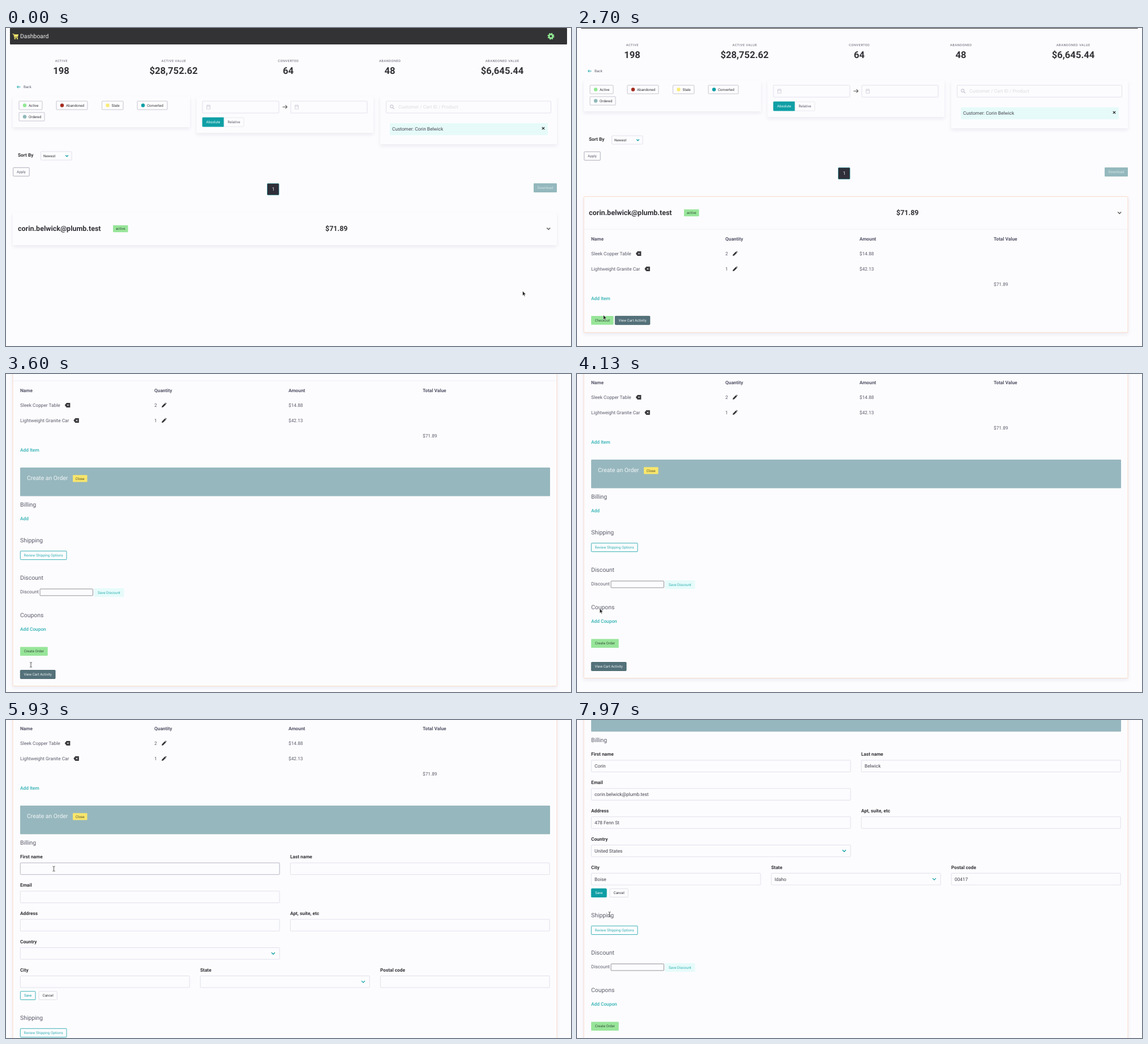
These frames come from a looping animation (998 by 561 pixels, 8000 ms). An HTML page:

```html
<!DOCTYPE html>
<html lang="en">
<head>
<meta charset="utf-8">
<title>Cart dashboard</title>
<style>
  html, body { margin: 0; width: 100%; height: 100%; overflow: hidden; background: #fcfcfe; }
  svg { display: block; width: 998px; height: 561px; font-family: Roboto, sans-serif; text-rendering: geometricPrecision; }
  text { white-space: pre; }
  .card { filter: drop-shadow(0 3px 3px rgba(20, 20, 70, .07)); }
</style>
</head>
<body>
<svg id="stage" viewBox="0 0 998 561"></svg>
<script>
const LOOP = 8000;
const SMALL = 6.3, BODY = 8.3, HEADING = 10.4;
const PAPER = '#fcfcfe', INK = '#5c5c6c', DARK = '#333338', TEAL = '#0f9fa5', LINK = '#2fb0b3',
      GREEN = '#98e59a', SLATE = '#54717a', MIST = '#97b7be', LINE = '#dadae8';
const customer = { first: 'Corin', last: 'Belwick', email: 'corin.belwick@plumb.test', street: '478 Fenn St', postal: '00417' };

// y is the vertical middle of the capitals
const text = (x, y, label, size = BODY, fill = INK, extra = '') =>
  `<text x="${x}" y="${y + size * .355}" font-size="${size}" fill="${fill}" ${extra}>${label}</text>`;
const centered = (x, y, label, size, fill, extra = '') => text(x, y, label, size, fill, `text-anchor="middle" ${extra}`);
const bold = (x, y, label, size = BODY, fill = DARK) => text(x, y, label, size, fill, 'font-weight="700"');
const link = (x, y, label, extra = '') => text(x, y, label, BODY, LINK, `font-weight="500" ${extra}`);
const box = (x, y, w, h, fill = 'none', stroke = 'none', extra = '') =>
  `<rect x="${x}" y="${y}" width="${w}" height="${h}" rx="1" fill="${fill}" stroke="${stroke}" stroke-width=".8" ${extra}/>`;
const button = (x, y, w, h, label, fill = 'none', stroke = 'none', ink = INK) =>
  box(x, y, w, h, fill, stroke) + centered(x + w / 2, y + h / 2, label, SMALL, ink);
const lines = (d, stroke = INK, width = 1) => `<path d="${d}" fill="none" stroke="${stroke}" stroke-width="${width}"/>`;
const chevron = (x, y, stroke = TEAL, size = 3) =>
  lines(`M${x - size} ${y - size / 2}l${size} ${size}l${size} ${-size}`, stroke, 1.3);
const group = (id, ...parts) => `<g id="${id}">${parts.join('')}</g>`;

const stat = (x, label, value) =>
  centered(x + .3, 58, label, 5.7, INK, 'letter-spacing=".52"') +
  centered(x, 75, value, 16.6, DARK, 'font-weight="700"');

const filter = (x, y, w, label, color) =>
  box(x, y, w, 15, PAPER, '#b6b6c4') +
  `<circle cx="${x + 10}" cy="${y + 7.5}" r="3.2" fill="${color}"/>` + text(x + 17, y + 7.5, label, SMALL, DARK);

const dateInput = x => box(x, 129, 135, 21, PAPER, LINE) +
  lines(`M${x + 7.5} 136.5h6v6.5h-6zM${x + 7.5} 138.5h6M${x + 9} 135v1.5M${x + 12} 135v1.5`, '#cfcfda', .9);

const backspace = (x, y) =>
  `<path d="M${x} ${y}l3-4h6.5v8H${x + 3}z" fill="${DARK}"/>` + lines(`M${x + 4} ${y - 1.6}l3.2 3.2m0-3.2l-3.2 3.2`, '#fff', .9);
const pencil = (x, y) =>
  `<path d="M${x - 4} ${y + 4}l.6-2.6 5-5 2 2-5 5zM${x + 2.2} ${y - 4}l.9-.6 1.6 1.6-.6.9z" fill="${DARK}"/>`;
const item = (y, name, iconX, count, price) =>
  text(25, y, name) + backspace(iconX, y) + text(262, y, count) + pencil(279, y) + text(499, y, price);

const header = box(7, 0, 984, 29, '#333335', 'none') +
  lines('M11.5 10.5h2l1.7 6.2h5.6', '#f2e56b', 1.2) +
  '<path d="M14.3 11.3h7.8l-1.2 4.2h-5.6z" fill="#f2e56b"/>' +
  '<g fill="#f2e56b"><circle cx="15.8" cy="18.7" r="1.2"/><circle cx="20" cy="18.7" r="1.2"/></g>' +
  text(25, 14.7, 'Dashboard', HEADING, '#f0f0f0') +
  '<g fill="none" stroke="#92e894"><circle cx="962.5" cy="14.6" r="3.4" stroke-width="2.8"/>' +
  '<circle cx="962.5" cy="14.6" r="5.1" stroke-width="1.8" stroke-dasharray="2.2 1.8"/></g>';

const stats = stat(97.5, 'ACTIVE', '198') + stat(296, 'ACTIVE VALUE', '$28,752.62') + stat(498.5, 'CONVERTED', '64') +
  stat(678, 'ABANDONED', '48') + stat(876.5, 'ABANDONED VALUE', '$6,645.44');

const filters =
  lines('M25.5 104h-6m2.4-2.3l-2.4 2.3 2.4 2.3', TEAL) + text(31, 104, 'Back', SMALL) +
  box(12, 121, 313, 54, PAPER, 'none', 'class="card"') +
  box(336.5, 121, 312.5, 64, PAPER, 'none', 'class="card"') +
  box(661, 121, 312, 84, PAPER, 'none', 'class="card"') +
  filter(23, 129, 41, 'Active', '#92e894') + filter(89, 129, 55, 'Abandoned', '#a52c20') +
  filter(169.5, 129, 37.5, 'Stale', '#f8ea78') + filter(232, 129, 53, 'Converted', TEAL) +
  filter(23, 149, 45, 'Ordered', '#8fb8b8') +
  dateInput(347) + dateInput(503) + lines('M488.5 139.2h8m-3-3l3 3-3 3', '#555', 1.1) +
  button(347, 158, 38, 16, 'Absolute', TEAL, TEAL, '#eefafa') + button(385, 158, 35, 16, 'Relative', PAPER, '#e3e3ee', INK) +
  box(671.5, 129, 291, 21, PAPER, LINE) +
  '<circle cx="681.3" cy="138.4" r="2.5" fill="none" stroke="#c9c9d4" stroke-width="1.2"/>' + lines('M683.2 140.3l2.6 2.6', '#c9c9d4', 1.4) +
  text(693, 139.3, 'Customer / Cart ID / Product', BODY, '#dcdce2') +
  box(678, 168, 279, 21, '#e6fbf9') + text(682, 178.5, `Customer: ${customer.first} ${customer.last}`, BODY, '#444450') +
  lines('M946.8 174.8l4.4 4.4m0-4.4l-4.4 4.4', '#222', 1.2) +
  bold(21, 224.3, 'Sort By') + box(61.5, 218, 54.5, 15, PAPER, LINE) + text(66, 225.8, 'Newest', SMALL, DARK) + chevron(107.5, 225.6, TEAL, 2.3) +
  button(12.7, 246.3, 28.5, 15, 'Apply', PAPER, '#9a9aab') +
  box(461.5, 274.5, 20.5, 20, '#2f2f39', '#1c7f86') + centered(472, 284.5, '1', BODY, '#e8e8ee') +
  button(932, 274, 41, 16, 'Download', '#94b8bd', 'none', '#d5e6e8');

const cartHead = bold(21, 354, customer.email, 12.5) +
  button(189, 348, 26.5, 12.3, 'active', GREEN, 'none', '#34503a') + bold(564, 354, '$71.89', 12.5) + chevron(958.3, 354, '#555', 3);

const cartBody = group('cartBody',
  lines('M12 383H973', '#ededf5', .8),
  ...[[25, 'Name'], [262, 'Quantity'], [499, 'Amount'], [736, 'Total Value']].map(([x, label]) => bold(x, 400.5, label, BODY, '#55556a')),
  item(426, 'Sleek Copper Table', 103.8, '2', '$14.88'),
  item(453, 'Lightweight Granite Car', 119.3, '1', '$42.13'),
  text(736, 479.6, '$71.89'), link(25, 504.7, 'Add Item'));

const cartActions = group('cartActions',
  button(25, 536, 39.5, 15.5, 'Checkout', GREEN, 'none', '#35503a'),
  button(67.3, 536.3, 61.5, 15, 'View Cart Activity', SLATE, '#365660', '#f0f4f5'));

const order = group('order',
  box(25, 536, 936, 50.5, MIST), text(37, 554.7, 'Create an Order', HEADING, '#f1f6f8'),
  button(118, 549.3, 25.5, 12.3, 'Close', '#f8e66c', 'none', '#55502c'),
  text(25, 601.2, 'Billing', HEADING), link(25, 626.2, 'Add', 'id="addBilling"'));

const rowY = row => 626.2 + row * 49.85;
const field = (row, x, w, label, value = '', select = false) => {
  const y = rowY(row);
  return bold(x, y, label) + box(x + .3, y + 10.8, w - .6, 20.6, PAPER, LINE) +
    text(x + 6, y + 21, value, BODY, '#42424c', 'class="value"') + (select ? chevron(x + w - 11.5, y + 21) : '');
};
const form = group('form',
  field(0, 25, 458.5, 'First name', customer.first), field(0, 502, 458.5, 'Last name', customer.last),
  field(1, 25, 458.5, 'Email', customer.email),
  field(2, 25, 458.5, 'Address', customer.street), field(2, 502, 458.5, 'Apt, suite, etc'),
  field(3, 25, 458.5, 'Country', 'United States', true),
  field(4, 25, 299.5, 'City', 'Boise'), field(4, 343, 299.5, 'State', 'Idaho', true), field(4, 661, 299.5, 'Postal code', customer.postal),
  box(25.3, 637, 457.9, 20.6, 'none', '#b4b4c2', 'id="activeField"'),
  button(25.4, 863.7, 26.6, 14.8, 'Save', PAPER, TEAL, TEAL),
  group('saveReady', button(25.4, 863.7, 26.6, 14.8, 'Save', TEAL, TEAL, '#f0fafa')),
  button(58, 863.7, 32.3, 14.8, 'Cancel', PAPER, '#dadae4', DARK));

const checkout = group('checkout',
  text(25, 664.2, 'Shipping', HEADING), button(25.3, 683.3, 81.7, 15.2, 'Review Shipping Options', PAPER, TEAL, LINK),
  text(25, 730.2, 'Discount', HEADING), text(25, 755.5, 'Discount'), box(60, 750.2, 93.5, 11.8, PAPER, '#777780'),
  button(155.5, 749, 53, 15.3, 'Save Discount', '#e6fbfa', 'none', LINK),
  text(25, 796.2, 'Coupons', HEADING), link(25, 821.2, 'Add Coupon'),
  button(25, 852.5, 48.7, 15.5, 'Create Order', GREEN, 'none', '#35503a'),
  button(25.3, 893.5, 61.7, 15, 'View Cart Activity', SLATE, '#365660', '#f0f4f5'));

const cursors = group('cursor',
  '<path id="arrow" d="M0 0V8.2L1.9 6.5 3.2 9.4 4.5 8.8 3.2 6H5.8Z" fill="#222" stroke="#fff" stroke-width=".5"/>',
  '<path id="hand" d="M0 .6Q.8-.4 1.6.6V4L5.6 4.8Q6.6 5.2 6.4 6.4L5.6 10H1.2L-1.6 6.4Q-1.6 5.2-.6 5.6L0 6.2Z" fill="#fff" stroke="#333" stroke-width=".8"/>',
  '<path id="beam" d="M-2-4.3Q0-4.3 0-3.3Q0-4.3 2-4.3M0-3.5V3.5M-2 4.3Q0 4.3 0 3.3Q0 4.3 2 4.3" fill="none" stroke="#444" stroke-width=".9"/>');

const stage = document.getElementById('stage');
stage.innerHTML = group('page', header, stats, filters,
  box(12, 325.5, 961, 57.5, PAPER, 'none', 'id="cart" class="card"'),
  cartHead, cartBody, cartActions, order, form, checkout) + cursors;

const el = id => document.getElementById(id);
const show = (node, on) => node.setAttribute('display', on ? 'inline' : 'none');
const values = [...stage.querySelectorAll('.value')];

// Eased interpolation between [time, ...values] keys
function track(keys, t) {
  const next = keys.findIndex(key => key[0] > t);
  if (next < 0) return keys.at(-1).slice(1);
  if (next === 0) return keys[0].slice(1);
  const a = keys[next - 1], b = keys[next];
  const p = (t - a[0]) / (b[0] - a[0]), k = p * p * (3 - 2 * p);
  return a.slice(1).map((v, i) => v + (b[i + 1] - v) * k);
}

const OPEN_CART = 1300, CHECKOUT = 3000, ADD = 5200, FILL = 6950;
const scrollKeys = [[0, 0], [1950, 0], [2200, 28], [3370, 28], [3600, 371], [3720, 385], [7560, 385], [7820, 566]];
const pointerKeys = [[0, 912.5, 464], [200, 912.5, 464], [1100, 125.5, 364.5], [1750, 125.5, 364.5], [2650, 47, 505],
  [2850, 44, 513], [3700, 44, 513], [4750, 33.5, 242.5], [5350, 33.5, 242.5], [5850, 84.5, 262.5],
  [6400, 84.5, 262.5], [6800, 84, 284], [7150, 84, 284], [7900, 57.5, 343]];
const shapeKeys = [[0, 'arrow'], [2800, 'hand'], [CHECKOUT, 'arrow'], [3480, 'beam'], [4000, 'arrow'],
  [4680, 'hand'], [5300, 'arrow'], [5700, 'beam']];

function render(t) {
  const opened = t >= OPEN_CART, ordering = t >= CHECKOUT, editing = t >= ADD, filled = t >= FILL;
  const formShift = editing ? 246 : 0;
  show(el('cartBody'), opened);
  show(el('cartActions'), opened && !ordering);
  show(el('order'), ordering);
  show(el('checkout'), ordering);
  show(el('form'), editing);
  show(el('addBilling'), !editing);
  show(el('activeField'), t >= 5750 && !filled);
  show(el('saveReady'), filled);
  values.forEach(node => show(node, filled));

  el('addBilling').setAttribute('fill', t >= 4680 ? DARK : LINK);
  el('checkout').setAttribute('transform', `translate(0 ${formShift})`);
  el('cart').setAttribute('height', ordering ? 596 + formShift : opened ? 239.5 : 57.5);
  el('cart').setAttribute('stroke', opened ? '#fad3bb' : 'none');

  el('page').setAttribute('transform', `translate(0 ${-track(scrollKeys, t)[0]})`);
  el('cursor').setAttribute('transform', `translate(${track(pointerKeys, t).join(' ')})`);
  const shape = shapeKeys.findLast(key => key[0] <= t)[1];
  ['arrow', 'hand', 'beam'].forEach(id => show(el(id), id === shape));
}

const start = performance.now();
function tick() {
  render((performance.now() - start) % LOOP);
  requestAnimationFrame(tick);
}
tick();
</script>
</body>
</html>
```
